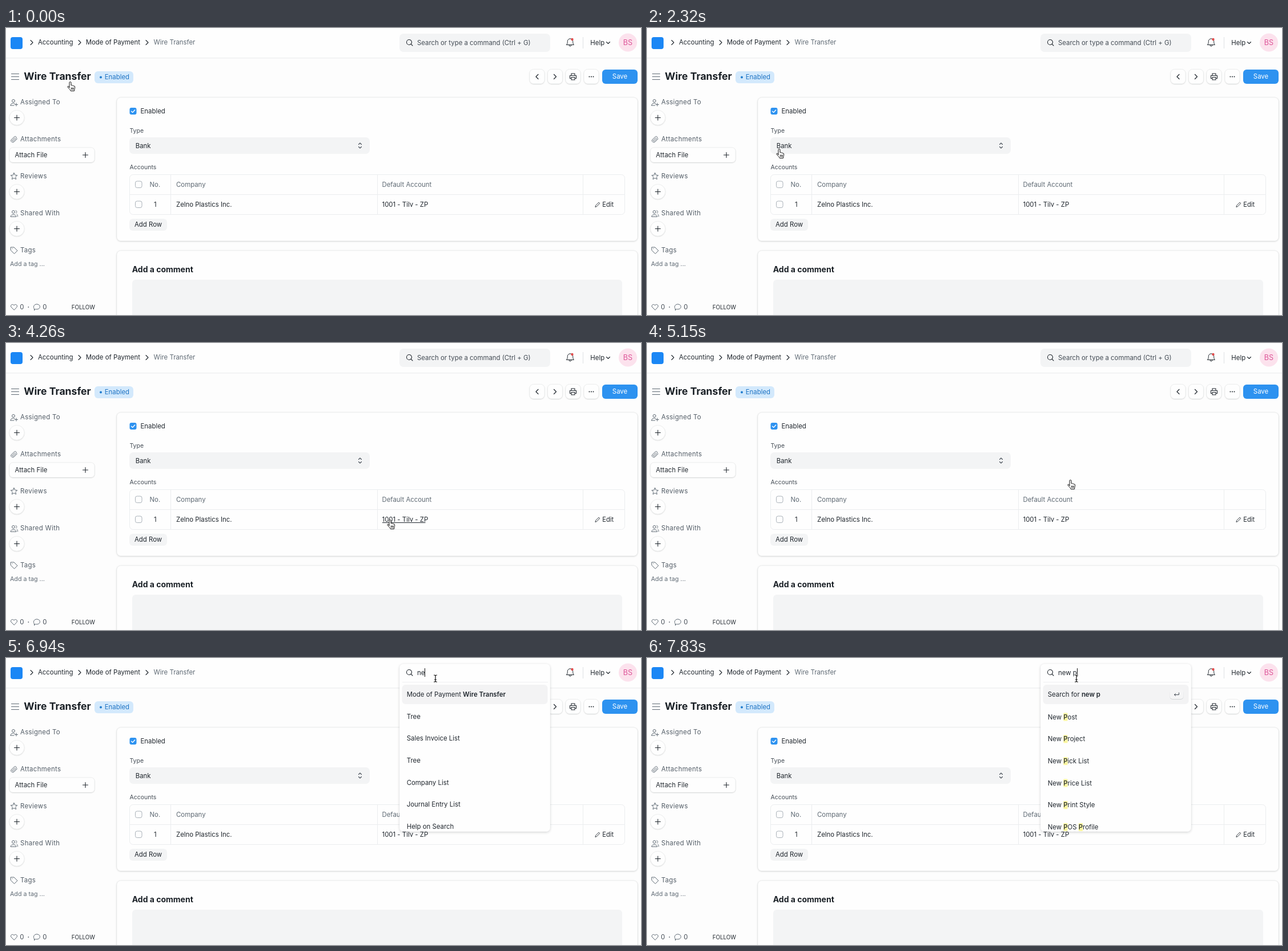
These frames come from a looping animation (1112 by 504 pixels, 8000 ms). An HTML page with a canvas:

```html
<!DOCTYPE html>
<html lang="en">
<head>
<meta charset="utf-8">
<title>Mode of Payment</title>
<style>
html, body { margin: 0; width: 100%; height: 100%; overflow: hidden; background: #fdfdfd; }
canvas { display: block; width: 1112px; height: 504px; }
</style>
</head>
<body>
<canvas id="stage"></canvas>
<script>
const W = 1112, H = 504, LOOP = 8000, SIZE = 11.4;
const canvas = document.getElementById('stage');
const ctx = canvas.getContext('2d');
const ratio = window.devicePixelRatio || 1;
canvas.width = W * ratio;
canvas.height = H * ratio;

const INK = '#20272e', MID = '#444c55', GREY = '#5f6a74', SOFT = '#f3f4f5', LINE = '#ebedef', BLUE = '#2d92f0';

// Text is placed by its left edge and the middle of its capitals.
function text(str, x, cy, { size = SIZE, weight = 400, color = INK, align = 'left', spacing = 0 } = {}) {
  ctx.font = `${weight} ${size}px Inter, sans-serif`;
  ctx.letterSpacing = spacing + 'px';
  ctx.textAlign = align;
  ctx.fillStyle = color;
  ctx.fillText(str, x, cy + size * 0.364);
  return ctx.measureText(str).width;
}

function box(x, y, w, h, r, fill, stroke) {
  ctx.beginPath();
  ctx.roundRect(x, y, w, h, r);
  if (fill) { ctx.fillStyle = fill; ctx.fill(); }
  if (stroke) { ctx.strokeStyle = stroke; ctx.lineWidth = 1; ctx.stroke(); }
}

function raised(x, y, w, h, r, { blur = 2, alpha = 0.18, edge = 0.06, drop = 0.8 } = {}) {
  ctx.save();
  ctx.shadowColor = `rgba(20,25,30,${alpha})`;
  ctx.shadowBlur = blur * ratio;
  ctx.shadowOffsetY = drop * ratio;
  box(x, y, w, h, r, '#fefefe');
  ctx.restore();
  box(x, y, w, h, r, '#fefefe', `rgba(25,35,45,${edge})`);
}

function icon(d, x, y, color = INK, width = 1, fill) {
  const path = new Path2D(d);
  ctx.save();
  ctx.translate(x, y);
  ctx.lineCap = ctx.lineJoin = 'round';
  if (fill) { ctx.fillStyle = fill; ctx.fill(path); }
  ctx.strokeStyle = color;
  ctx.lineWidth = width;
  ctx.stroke(path);
  ctx.restore();
}

function disc(x, y, r, color) {
  ctx.beginPath();
  ctx.arc(x, y, r, 0, Math.PI * 2);
  ctx.fillStyle = color;
  ctx.fill();
}

function line(x1, y1, x2, y2, color = LINE) {
  ctx.beginPath();
  ctx.moveTo(x1, y1);
  ctx.lineTo(x2, y2);
  ctx.strokeStyle = color;
  ctx.lineWidth = 1;
  ctx.stroke();
}

const ICON = {
  right: 'M-2-4L2 0L-2 4', left: 'M2-4L-2 0L2 4', down: 'M-3-1.5L0 1.5L3-1.5',
  plus: 'M-4.5 0H4.5M0-4.5V4.5',
  search: 'M4-.5A4.5 4.5 0 1 1-5-.5A4.5 4.5 0 1 1 4-.5M2.8 2.8L5.5 5.5',
  bell: 'M-6.5 4H6.5C5 2.5 4.7 1 4.7-2A4.7 4.7 0 0 0-4.7-2C-4.7 1-5 2.5-6.5 4ZM-2 4.5A2 2 0 0 0 2 4.5',
  menu: 'M-6.5-5H6.5M-6.5 0H6.5M-6.5 5H6.5',
  print: 'M-3-2V-5.5H3V-2M-3 3H-5.5V-2H5.5V3H3M-3 1H3V5.5H-3Z',
  user: 'M1.5-2.5A2.5 2.5 0 1 1-3.5-2.5A2.5 2.5 0 1 1 1.5-2.5M-6 5.5C-6 1 0 1 1.5 2.5M-6 5.5H0M4 1.5V6.5M1.5 4H6.5',
  clip: 'M5.5-1L0 4.5C-3 7-7 3-4.5 .5L.5-4.5C2.5-6.5 5.5-3.5 3.5-1.5L-1 3C-2.3 4-3.7 2.5-2.7 1.5L1.5-2.5',
  star: 'M0-6L1.7-2.2L5.8-1.8L2.7 1L3.6 5.2L0 3L-3.6 5.2L-2.7 1L-5.8-1.8L-1.7-2.2Z',
  share: 'M1.5-2.5A2.5 2.5 0 1 1-3.5-2.5A2.5 2.5 0 1 1 1.5-2.5M-6 5.5C-6 1 4 1 4 5.5ZM3-5C5.5-4.5 5.5-1 3.5-.5M5 1.5C6 2.2 6.5 3.5 6.5 5.5',
  tag: 'M-5.5-5.5H0L6 .5L.5 6L-5.5 0ZM-2.7-3.2V-3',
  heart: 'M0 5L-5 0C-7-3-3-6.5 0-3C3-6.5 7-3 5 0Z',
  bubble: 'M-3 4L-4.5 6V3C-7 0-5-5 0-5C7-5 7.5 4 0 4Z',
  pencil: 'M-4 4L-3.4 1.7L2-3.7L3.8-2L-1.6 3.4Z',
  updown: 'M-2.5-2L0-4.5L2.5-2M-2.5 2L0 4.5L2.5 2',
  enter: 'M4-3V.5H-4M-2-1.5L-4 .5L-2 2.5',
  check: 'M-3 .2L-.8 2.3L3.2-2',
  hand: 'M4 10.5V2A1.5 1.5 0 0 1 7 2V6.5Q8.5 5.8 9.4 7.2Q11 6.6 11.8 8Q13.6 7.7 13.6 9.3V11.5C13.6 13 12.6 13.8 12.6 16.5H6.2C6 14.5 3 12.5 1 9.8C.3 8.5 1.7 7.6 2.7 8.6ZM7.4 11V14M9.4 11V14M11.3 11V14',
  beam: 'M-2.5-6Q0-6 0-4.5Q0-6 2.5-6M0-4.5V4.5M-2.5 6Q0 6 0 4.5Q0 6 2.5 6M-1.5 2H1.5'
};

function navbar() {
  ctx.fillStyle = '#fefefe';
  ctx.fillRect(0, 0, W, 52);
  line(0, 52.5, W, 52.5, '#eeeff0');
  line(0, 53.5, W, 53.5, '#f8f8f9');
  box(8, 16, 21, 21, 4, '#1b87f5');
  for (const x of [45, 129, 247]) icon(ICON.right, x, 25.5, INK, 1.1);
  text('Accounting', 56, 25.2);
  text('Mode of Payment', 139.7, 25.2);
  text('Wire Transfer', 258.5, 25.2, { color: GREY });
  icon(ICON.bell, 988, 25.5, INK, 1);
  disc(991.5, 20, 2.2, '#e24c4c');
  line(1010.5, 16, 1010.5, 36, '#dfe2e4');
  text('Help', 1023.3, 25.5);
  icon(ICON.down, 1054.5, 26, INK, 1.1);
  disc(1089, 25.5, 16, '#fce2ed');
  text('BS', 1089, 25.7, { size: 12.6, color: '#dd5598', align: 'center' });
}

function header() {
  icon(ICON.menu, 16, 85.5, GREY, 1.1);
  text('Wire Transfer', 31.3, 84.6, { size: 17.6, weight: 700, color: '#1a2026' });
  box(155, 76, 68, 21, 6, '#d3e9fc');
  disc(166, 86.5, 2, '#1f7ccf');
  text('Enabled', 172.7, 86.3, { color: '#1f74c4' });
  for (const x of [930, 961.5, 993, 1025]) raised(x - 13, 72.5, 26, 25.5, 7);
  icon(ICON.left, 930, 85.5, INK, 1.2);
  icon(ICON.right, 961.5, 85.5, INK, 1.2);
  icon(ICON.print, 993, 85.5, INK, 1.1);
  for (const dx of [-3.5, 0, 3.5]) disc(1025 + dx, 85.5, 1, INK);
  box(1044, 73, 62, 25, 6, BLUE);
  text('Save', 1075, 85.2, { color: '#fff', align: 'center' });
}

function sidebar() {
  const heads = [['Assigned To', 'user'], ['Attachments', 'clip'], ['Reviews', 'star'], ['Shared With', 'share'], ['Tags', 'tag']];
  heads.forEach(([label, name], i) => {
    const y = 130 + 65 * i;
    icon(ICON[name], 14, y + 0.5, GREY, 1);
    text(label, 25, y + 0.2, { color: '#535d67', spacing: 0.32 });
    if (['user', 'star', 'share'].includes(name)) {
      raised(6, y + 14.5, 26, 26, 13);
      icon(ICON.plus, 19, y + 27.5, INK, 1.1);
    }
  });
  raised(6, 210, 149, 26, 6);
  text('Attach File', 15.5, 223);
  icon(ICON.plus, 139, 223, INK, 1.1);
  text('Add a tag ...', 7, 414, { size: 10.7, color: GREY });
  icon(ICON.heart, 14, 490, GREY, 1);
  text('0', 24.3, 490, { color: MID });
  text('·', 37.5, 490, { weight: 600, color: MID });
  icon(ICON.bubble, 54, 490, GREY, 1);
  text('0', 64.3, 490, { color: MID });
  text('FOLLOW', 114.7, 490, { size: 9.8 });
}

function link(str, x, width, on) {
  text(str, x - 0.5, 309.6);
  if (on) line(x, 315.5, x + width, 315.5, INK);
}

function cards(hover) {
  raised(194, 122, 912, 252, 7, { blur: 3 });
  raised(194, 391, 912, 140, 7, { blur: 3 });
  box(216.5, 140, 12, 12, 3, BLUE);
  icon(ICON.check, 222.5, 146, '#fff', 1.4);
  text('Enabled', 235.5, 146.2);
  text('Type', 216.5, 179.7, { size: 10.5, color: MID });
  box(216, 192, 421, 29, 7, SOFT);
  text('Bank', 226.7, 206.5);
  icon(ICON.updown, 620, 206.5, MID, 1.1);
  text('Accounts', 216.5, 244.5, { size: 10.5, color: MID });

  box(216.5, 257.5, 867, 70, 6, null, LINE);
  line(217, 292.5, 1083, 292.5);
  for (const x of [288.5, 650.5, 1010.5]) line(x, 258, x, 327);
  for (const y of [275, 310]) box(226.5, y - 6, 11.5, 11.5, 3, '#fefefe', '#aab2b9');
  text('No.', 251.5, 275, { color: GREY });
  text('Company', 298, 275, { color: GREY });
  text('Default Account', 658.5, 275, { color: GREY });
  text('1', 261.3, 309.7, { align: 'center' });
  link('Zelno Plastics Inc.', 298.5, 90.5, hover === 'company');
  link('1001 - Tilv - ZP', 659, 75.5, hover === 'account');
  icon(ICON.pencil, 1036, 310, INK, 0.9);
  text('Edit', 1044.3, 310.2, { size: 11.1 });
  box(216, 335, 66, 21, 6, SOFT);
  text('Add Row', 225, 345.3);

  text('Add a comment', 220.7, 424, { size: 14, weight: 700, color: '#1a2026' });
  box(221, 442, 858, 80, 6, SOFT);
}

const RECENT = ['Tree', 'Sales Invoice List', 'Tree', 'Company List', 'Journal Entry List', 'Help on Search'];
const CREATE = ['New Item', 'New Lead', 'New Task', 'New Sales Invoice', 'New Payment Reconciliation', 'New Quotation'];
const MATCHES = ['New Post', 'New Project', 'New Pick List', 'New Price List', 'New Print Style', 'New POS Profile'];

function result(label, cy, marked) {
  let x = 701.7;
  for (const part of marked ? label.split(/(P(?=[a-zO]))/) : [label]) {
    const hit = marked && part === 'P', weight = hit ? 500 : 400;
    if (hit) {
      ctx.font = `${weight} ${SIZE}px Inter, sans-serif`;
      ctx.letterSpacing = '0px';
      box(x, cy - 7, ctx.measureText(part).width, 14, 1, '#fbf6a0');
    }
    x += text(part, x, cy, { weight });
  }
}

function enterKey() {
  box(915.5, 56, 24, 17, 5, '#d3d6d8');
  box(915.5, 55, 24, 17, 5, '#f5f5f6');
  icon(ICON.enter, 927.5, 64, MID, 1);
}

function dropdown(query) {
  const searching = query.length > 2, marked = query.endsWith('p');
  raised(689, 10, 264, 295, 7, { blur: 4, alpha: 0.16, edge: 0.03, drop: 1.5 });
  line(694, 42.5, 949, 42.5, '#eff0f1');
  box(693.5, 47, 255, 34, 6, '#f3f3f4');
  const lead = searching ? 'Search for ' : 'Mode of Payment ';
  const width = text(lead, 701.7, 64);
  text(searching ? query.trim() : 'Wire Transfer', 701.7 + width, 64, { weight: 600 });
  if (searching) enterKey();
  ctx.save();
  ctx.beginPath();
  ctx.rect(689, 42, 264, 263);
  ctx.clip();
  const items = marked ? MATCHES : searching ? CREATE : RECENT;
  items.forEach((label, i) => result(label, (searching ? 103.5 : 102.5) + 38.7 * i, marked));
  ctx.restore();
}

function searchBar(t) {
  const typed = [[7830, 'new p'], [7300, 'new '], [7120, 'new'], [6940, 'ne'], [6760, 'n']].find(([at]) => t >= at);
  const query = typed ? typed[1] : '';
  if (t >= 6050) dropdown(query);
  else if (t >= 5870) raised(689, 10, 264, 32, 7, { blur: 3, edge: 0.04 });
  else box(689, 10, 264, 32, 7, SOFT);
  icon(ICON.search, 706.5, 25.5, INK, 1.1);
  const width = text(query || 'Search or type a command (Ctrl + G)', 720, 25.6, { color: query ? INK : MID });
  if (t >= 5870 && (t < 6400 || t >= 6760)) {
    const x = query ? Math.round(720 + width) + 0.5 : 721.5;
    line(x, 18, x, 33, '#111');
  }
}

// Pointer stops: time, left, top.
const STOPS = [
  [0, 107, 94], [180, 96, 93], [360, 62, 92], [540, 38, 92], [720, 48, 91], [890, 78, 92], [1070, 99, 93],
  [1250, 190, 114], [1430, 121, 92], [1600, 122, 93],
  [1960, 134, 103], [2140, 172, 148], [2320, 226, 212], [2500, 288, 270], [2670, 336, 305], [2850, 358, 314],
  [3020, 365, 315], [3200, 384, 315],
  [3560, 410, 320], [3740, 540, 337], [3910, 739, 344], [4090, 697, 334], [4260, 667, 310], [4440, 724, 303],
  [4620, 742, 300], [4970, 741, 290], [5150, 736, 240], [5330, 727, 165], [5510, 731, 82]
];

function pointer(t) {
  if (t < 5690) {
    const [, x, y] = STOPS.findLast(([at]) => t >= at);
    icon(ICON.hand, x, y, '#111', 1, '#fff');
    return;
  }
  icon(ICON.beam, 752, 36, '#fff', 2.5);
  icon(ICON.beam, 752, 36, '#111', 1.2);
  if (t >= 5870 && t < 6050) {
    ctx.beginPath();
    ctx.arc(752.5, 35, 9, 0, Math.PI * 2);
    ctx.strokeStyle = '#222';
    ctx.lineWidth = 1;
    ctx.stroke();
  }
}

function hovered(t) {
  if (t >= 2850 && t < 3200) return 'company';
  if (t >= 4260 && t < 4620) return 'account';
}

function draw() {
  const t = performance.now() % LOOP;
  ctx.setTransform(ratio, 0, 0, ratio, 0, 0);
  ctx.fillStyle = '#fdfdfd';
  ctx.fillRect(0, 0, W, H);
  navbar();
  header();
  sidebar();
  cards(hovered(t));
  searchBar(t);
  pointer(t);
  requestAnimationFrame(draw);
}
draw();
</script>
</body>
</html>
```
